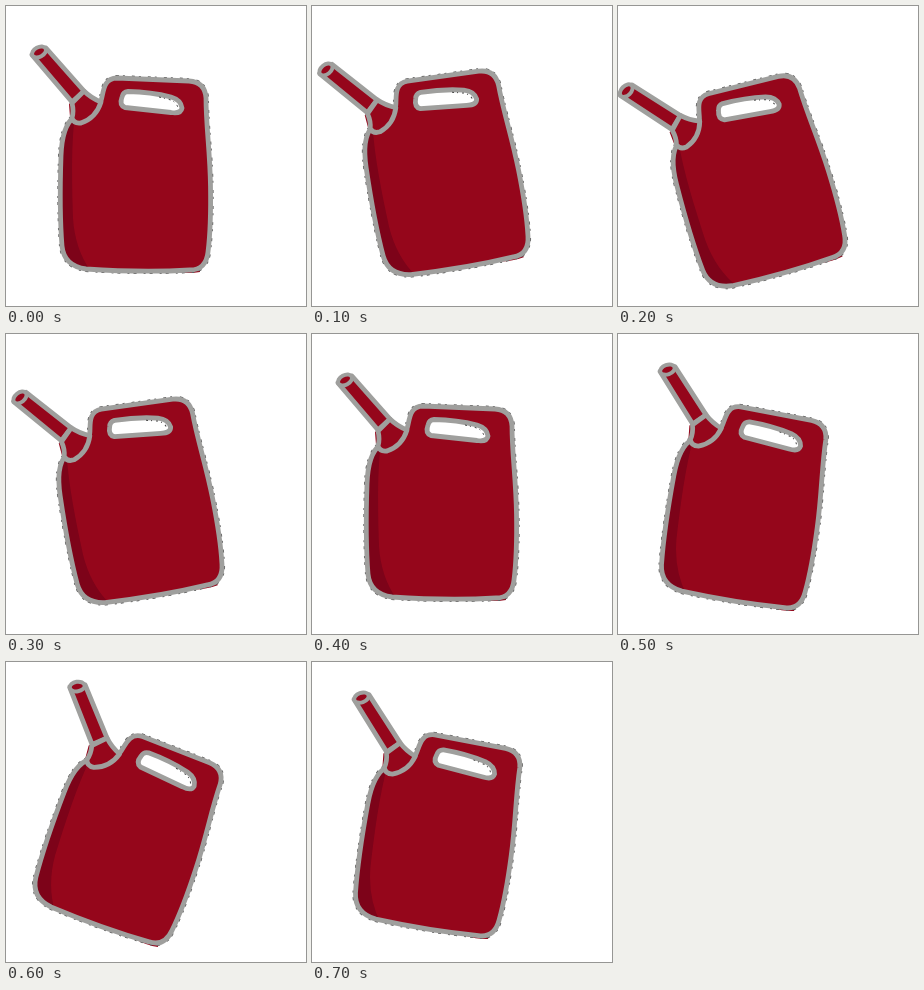
Write an HTML page that moves like this. It is 300x300 px and loops after 0.8 s.

```html
<!DOCTYPE html>
<html lang="en">
<head>
<meta charset="utf-8">
<title>Rocking fuel can</title>
<style>
  html, body { margin: 0; width: 100%; height: 100%; overflow: hidden; background: #fff; }
  svg { display: block; width: 100%; height: 100%; }
  .line { stroke: #9f9f9d; stroke-width: 4.8; stroke-linejoin: round; stroke-linecap: round; }
  .red { fill: #95061b; }
  .speck { fill: none; stroke: #444; stroke-width: 1; stroke-dasharray: 2 3 1 4; }
  .fringe { fill: none; stroke: #555; stroke-width: 6; stroke-dasharray: 3 4 2 7; }
</style>
</head>
<body>
<svg viewBox="0 0 300 300">
  <defs>
    <path id="body" d="M94 97 C98 91 95 72 111 72 L183 75 Q199 76 200 92
      C200 120 204 145 204.500 180 C205 210 204 230 202 246 Q200 264 184 264
      C150 266 110 265 80 263 Q58 260 56 240 C54 215 54 180 55 150 Q56 120 68 111 Z"/>
    <clipPath id="inside"><use href="#body"/></clipPath>
  </defs>
  <g id="can">
    <path class="red" d="M63 98 L72 90 L80 108 L64 111 Z M170 262 L194 262 L194 266 Q183 268 170 266 Z"/>
    <use href="#body" class="fringe"/>
    <use href="#body" class="red"/>
    <path clip-path="url(#inside)" fill="#7d0319" d="M50 108 L69 108 C65 140 66 180 67 212 Q69 244 86 267 L50 267 Z"/>
    <use href="#body" class="line" fill="none"/>
    <path class="line" fill="#fff" d="M122 85.500 Q145 86 165 91 Q175 94 176 102 Q175 108 165 106.500
      L119 101.500 Q113 99 116 91 Q117 86 122 85.500 Z"/>
    <path class="speck" d="M153 91 L165 94 Q171 97 172 102"/>
    <path class="line red" d="M26 49 L66 96 L78 85 L40 42 Z"/>
    <path class="line red" d="M78 85 L66 97 Q68 105 66 112 Q68 118 75 117 Q90 112 95 96 Q85 92 78 85 Z"/>
    <ellipse class="line red" cx="33" cy="46" rx="7.500" ry="4.800" transform="rotate(-28 33 46)" style="stroke-width:4"/>
  </g>
</svg>
<script>
  // Each pose: angle, shift x, shift y
  const rest = [0, 0, 0];
  const left = [-10.3, -2, -1.2];
  const farLeft = [-16.3, 0.6, 7.8];
  const right = [8.5, 0, 2.5];
  const farRight = [19, -0.8, 3.8];
  const poses = [rest, left, farLeft, left, rest, right, farRight, right];
  const can = document.getElementById("can");

  function draw() {
    const step = Math.floor(performance.now() / 100) % poses.length;
    const [angle, x, y] = poses[step];
    can.setAttribute("transform", `translate(${x} ${y}) rotate(${angle} 128 150)`);
    requestAnimationFrame(draw);
  }
  draw();
</script>
</body>
</html>
```
